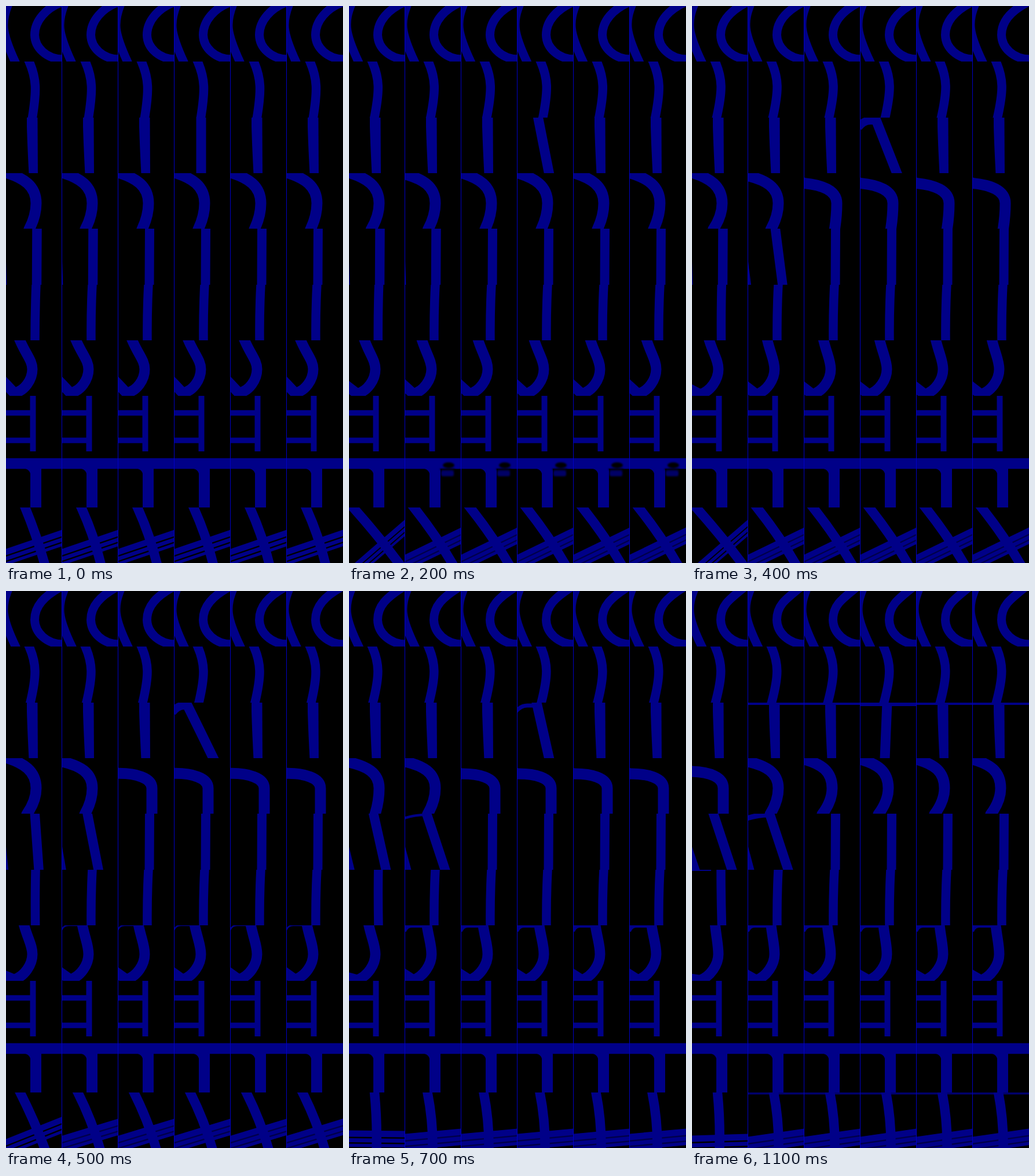
An HTML page for the animation above (1200 ms loop, 582x963 px).

```html
<!DOCTYPE html>
<html lang="en">
<head>
<meta charset="utf-8">
<title>Strokes</title>
<style>
  html, body { margin: 0; width: 100%; height: 100%; overflow: hidden; background: #000; }
  #stage { display: block; width: 582px; height: 963px; }
</style>
</head>
<body>
<svg id="stage" viewBox="0 0 582 963">
  <defs><filter id="soft" x="-50%" y="-50%" width="200%" height="200%"><feGaussianBlur stdDeviation="1.5"/></filter></defs>
  <g id="cells" fill="none" stroke="#000088"></g>
  <path id="rules" stroke="#0000c4" fill="none"/>
</svg>
<script>
const COLS = 6, ROWS = 10, CELL_W = 97, STEP_MS = 100, STEPS = 12, LAST = STEPS - 1;
const rowTop = r => Math.round(r * 96.3);

let step = 0;

const progress = (start, end) => Math.min(1, Math.max(0, (step - start) / (end - start)));
// Linear change between two steps, held before and after.
const glide = (a, b, start = 0, end = LAST) => a + (b - a) * progress(start, end);
// The same with a decelerating end.
const settle = (a, b) => a + (b - a) * (1 - (1 - progress(0, LAST)) ** 2);
// Rises from 0 to 1, holds, and falls back to 0.
const swell = (rise, full, fall, end) => progress(rise, full) - progress(fall, end);

const stroke = (d, w, extra = '') => w > 0.1 ? `<path d="${d}" stroke-width="${w}" ${extra}/>` : '';
const fill = d => `<path d="${d}" fill="#000088" stroke="none"/>`;

// A stem crossing the whole cell, run on past both clipped edges.
function stem(top, bottom, w, mid = (top + bottom) / 2) {
  return stroke(`M${top - (mid - top) * 0.2},-10 L${top},0 Q${mid},48 ${bottom},97 L${bottom + (bottom - mid) * 0.2},107`, w);
}

function ringRow() {
  return stroke(`M${glide(98, 91)},-7 C${glide(69, 62)},${glide(3, 16)} 49.5,26 49.5,50 C50,72 70,92 99,92`, 15) +
    stroke(`M5,-6 C-9,28 -8,45 ${settle(16, 17.5)},97 l3,8`, 15);
}

function bowRow() {
  return stroke(`M36,-9 L40,0 C53,30 53,50 ${settle(45.5, 40.5)},97 l-3,9`, 15.5);
}

function legRow(c) {
  const bar = stroke(`M${c === 3 ? 0 : glide(46, 0, 9)},2 H97`, c ? glide(0, c === 3 ? 8 : 4, 7) : 0);
  if (c !== 3) return fill('M36,0 V15 Q37,50 39.5,97 H55 L54.5,0Z') + bar;
  const kick = swell(0, 5, 5, 9);
  const top = 46 - 26 * kick;
  const bottom = 46 + 21.5 * kick - glide(0, 4, 5, 9);
  return stem(top, bottom, 17) + stroke(`M-4,17 Q5,5 17,5 H${top}`, 14 * swell(2, 4, 5, 9)) + bar;
}

// Start height, side position and foot of the hook that swells into an arch.
function archPose(c) {
  if (c === 0) return [glide(-1, 23, 5), glide(52, 54, 7, 9), 40 - glide(0, 4, 0, 5) + glide(0, 18, 5, 9)];
  if (c === 1) return [glide(-1, 6, 0, 5), 52, glide(40, 38)];
  const arch = swell(2, 5, 7, LAST);
  return [26 * arch + glide(-1, 2), 52 + 6 * arch - glide(0, 4, 7), 41 + 17 * arch - glide(0, 10, 7)];
}

function archRow(c) {
  const [y, side, foot] = archPose(c);
  return stroke(`M-10,${y - 3} L0,${y} C30,${y * 0.65 + 9} ${side},${22 + y * 0.45} ${side},52 Q${side},74 ${foot},97 l-3,9`, 19);
}

function slantRow(c) {
  if (c > 1) return stem(54, 53.5, 16);
  const lean = c ? progress(2, 7) : glide(0, 0.68, 4, 7) + glide(0, 0.32, 9);
  return stem(53.5 - 16.5 * lean, 53 + 16 * lean, 16.5) +
    fill(`M0,57 L${1.5 + (c ? 9 : 12) * lean},97 H0Z`) +
    stroke('M-2,8 Q16,2 36,2', c ? glide(0, 9, 5, 9) : 0);
}

function postRow(c) {
  if (c) return stem(52, 50, 15.5, 49.5);
  return stem(glide(52, 50), glide(50, 51.5), 15.5, 50) + stroke('M0,0 H33', glide(0, 4, 9));
}

function hookRow(c) {
  const top = c ? settle(24, 39.5) : glide(24, 40);
  const bowl = settle(91, 95);
  const tail = settle(76, c ? 87 : 93);
  const bend = (top + 45.5) / 2;
  return stroke(`M${top - (bend - top) * 0.4},-10 L${top},0 C${bend},25 45.5,35 45.5,50 C45.5,68 32,88 14,${bowl} L0,${tail} l-10,${(tail - bowl) * 0.7}`, 18) +
    stroke(`M-2,10 Q2,0 11,0 H${top}`, c ? glide(0, 8, 4, 7) : 0);
}

function ladderRow() {
  return stroke('M46.5,0 V96', 10) + stroke('M0,29.5 H46 M0,77 H46', 9.5);
}

function teeRow(c) {
  const spot = c ? swell(0, 2, 2, 4) : 0;
  const blot = spot ? `<g opacity="${spot}" stroke="none" filter="url(#soft)">
    <rect x="62" y="33" width="22" height="10" rx="3" fill="#000066"/>
    <path d="M60,31 H86" stroke="#000" stroke-width="2"/>
    <ellipse cx="75" cy="24" rx="10" ry="5" fill="#000"/></g>` : '';
  return stroke('M0,21 H97', 18.5) + stroke('M51.5,30 V97', 19) + fill('M28,29 Q42,30 42.5,42 V29Z') + blot;
}

// A leg over three rails: both tip sharply, then swing level.
function crossRow(c) {
  const tip = swell(0, 2, 4, 5.5), level = progress(4, 7);
  const top = 33 - (c ? 18 : 26) * tip + glide(0, 11, 5, c ? 9 : 7);
  const bottom = 66.5 + (c ? 15 : 20) * tip - 19 * level + (c ? glide(0, 5, 9) : 0);
  const left = 77 + (c ? 10 : 33) * tip - (c ? 0 : 6 * level) + glide(0, c ? 5 : 9, 7);
  const right = 44 + (c ? 24 * level - 4 * tip : 28 * level - 18 * tip + glide(0, 5, 7, 9));
  const slope = Math.atan2(right - left, CELL_W) * 180 / Math.PI;
  const rail = (y, w, extra) => stroke(`M0,${y} H97`, w, extra);
  return `<g transform="translate(0 ${left}) skewY(${slope})">` +
    rail(9, 28, `opacity="${c ? glide(0, 0.55, 0, 2) : 0}"`) + rail(0, 11) + rail(11.5, 7) + rail(20.3, 5.5) + '</g>' +
    stem(top, bottom, 16.5, (top + bottom) / 2 + (c ? 5 : 3)) +
    stroke('M0,1.5 H97', c ? glide(0, 4, 7) : 0, 'opacity=".8"');
}

const rowArt = [ringRow, bowRow, legRow, archRow, slantRow, postRow, hookRow, ladderRow, teeRow, crossRow];
const cells = document.getElementById('cells');
document.getElementById('rules').setAttribute('d',
  Array.from({ length: COLS - 1 }, (_, i) => `M${(i + 1) * CELL_W - 0.5},0 V963`).join(''));

function draw() {
  let art = '';
  for (let r = 0; r < ROWS; r++)
    for (let c = 0; c < COLS; c++)
      art += `<svg x="${c * CELL_W}" y="${rowTop(r)}" width="${CELL_W}" height="${rowTop(r + 1) - rowTop(r)}" overflow="hidden">${rowArt[r](c)}</svg>`;
  cells.innerHTML = art;
}

const began = performance.now();
function tick() {
  const next = Math.floor((performance.now() - began) / STEP_MS) % STEPS;
  if (next !== step) {
    step = next;
    draw();
  }
  requestAnimationFrame(tick);
}
draw();
tick();
</script>
</body>
</html>
```
